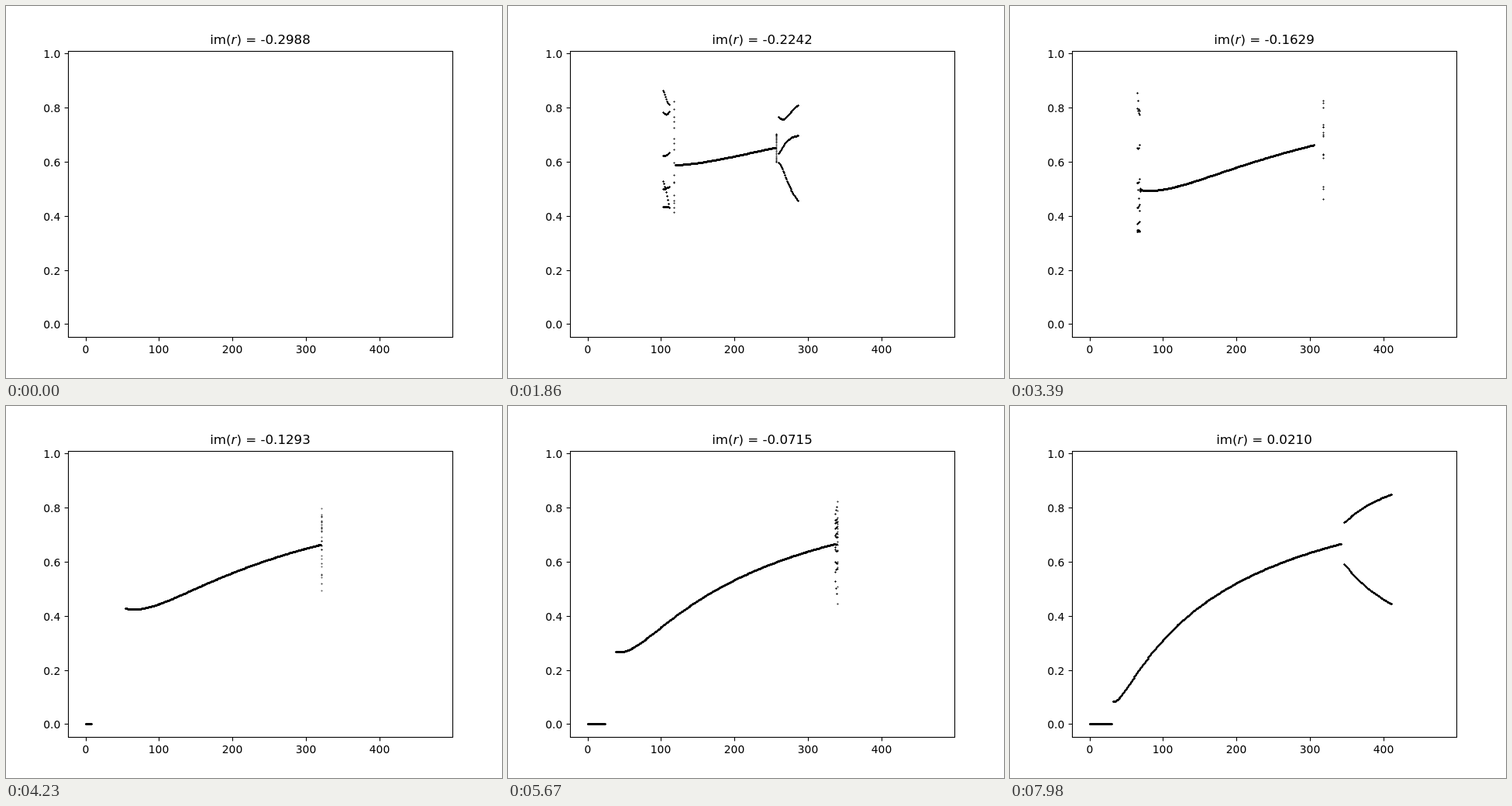
Recreate the animation shown at these times as an HTML page with a canvas. Size 640 by 480 pixels, loop 8000 ms.

```html
<!DOCTYPE html>
<html lang="en">
<head>
<meta charset="utf-8">
<title>Complex logistic map</title>
<style>
  html, body { margin: 0; width: 100%; height: 100%; overflow: hidden; background: #fff; }
  canvas { display: block; width: 640px; height: 480px; }
</style>
</head>
<body>
<canvas id="stage" width="640" height="480"></canvas>
<script>
const ctx = document.getElementById('stage').getContext('2d');
const LOOP = 8000, STEP = 30;
const SAMPLES = 500, BURN_IN = 5000, KEPT = 100;
const FAMILY = '"DejaVu Sans", sans-serif';
const AXES = { left: 80, right: 576, top: 58, bottom: 427 };

// Opacity of one hit at the marker's centre, edges and corners
const MARKER = [0.25, 0.12, 0.004];

const linspace = (from, to, i) => from + (to - from) * i / (SAMPLES - 1);
const toX = index => Math.floor(102.545 + 0.94928 * index + 0.5);
const toY = value => Math.floor(410.4 - 349.45 * value + 0.5);

// Iterates z -> 4rz(1 - z) and counts how often each pixel is hit by |z|.
function countHits(imR) {
  const hits = new Map();
  const b = 4 * imR;
  for (let i = 0; i < SAMPLES; i++) {
    const a = 4 * linspace(0.2, 1, i);
    const x = toX(i);
    const column = [];
    let re = 0.5, im = 0, bounded = true;
    for (let n = 0; n < BURN_IN + KEPT; n++) {
      const u = re - re * re + im * im;
      const v = im - 2 * re * im;
      re = a * u - b * v;
      im = a * v + b * u;
      if (re * re + im * im > 100) { bounded = false; break; }
      if (n >= BURN_IN) column.push(toY(Math.hypot(re, im)));
    }
    if (!bounded) continue;
    for (const y of column) {
      const key = y * 640 + x;
      hits.set(key, (hits.get(key) || 0) + 1);
    }
  }
  return hits;
}

function drawPoints(imR) {
  for (const [key, count] of countHits(imR)) {
    const x = key % 640, y = Math.floor(key / 640);
    for (let dy = -1; dy <= 1; dy++) {
      for (let dx = -1; dx <= 1; dx++) {
        const opacity = MARKER[Math.abs(dx) + Math.abs(dy)];
        ctx.globalAlpha = 1 - (1 - opacity) ** count;
        ctx.fillRect(x + dx, y + dy, 1, 1);
      }
    }
  }
  ctx.globalAlpha = 1;
}

function line(x1, y1, x2, y2) {
  ctx.beginPath();
  ctx.moveTo(x1, y1);
  ctx.lineTo(x2, y2);
  ctx.stroke();
}

function drawAxes() {
  const { left, right, top, bottom } = AXES;
  ctx.lineWidth = 1.1;
  ctx.strokeRect(left + 0.5, top + 0.5, right - left, bottom - top);
  ctx.font = `13.89px ${FAMILY}`;
  ctx.textAlign = 'center';
  for (let value = 0; value <= 400; value += 100) {
    const x = toX(value) + 0.5;
    line(x, bottom + 0.5, x, bottom + 5.4);
    ctx.fillText(value, x - 0.5, 448);
  }
  ctx.textAlign = 'right';
  for (let tenths = 0; tenths <= 10; tenths += 2) {
    const y = toY(tenths / 10) + 0.5;
    line(left - 4.4, y, left + 0.5, y);
    ctx.fillText((tenths / 10).toFixed(1), 70.3, y + 5);
  }
}

function drawTitle(imR) {
  const plain = `16.67px ${FAMILY}`;
  const parts = [
    ['im(', plain],
    ['r', `italic ${plain}`],
    [`) = ${imR.toFixed(4)}`, plain]
  ].map(([text, font]) => {
    ctx.font = font;
    return { text, font, width: ctx.measureText(text).width };
  });
  let x = 328 - parts.reduce((sum, part) => sum + part.width, 0) / 2;
  ctx.textAlign = 'left';
  for (const { text, font, width } of parts) {
    ctx.font = font;
    ctx.fillText(text, x, 49);
    x += width;
  }
}

let shown = -1;
function tick() {
  const frame = Math.floor((performance.now() % LOOP) / STEP + 1e-6);
  if (frame !== shown) {
    shown = frame;
    const imR = linspace(-0.3, 0.3, frame + 1);
    ctx.fillStyle = '#fff';
    ctx.fillRect(0, 0, 640, 480);
    ctx.fillStyle = ctx.strokeStyle = '#000';
    drawPoints(imR);
    drawAxes();
    drawTitle(imR);
  }
  requestAnimationFrame(tick);
}
tick();
</script>
</body>
</html>
```
